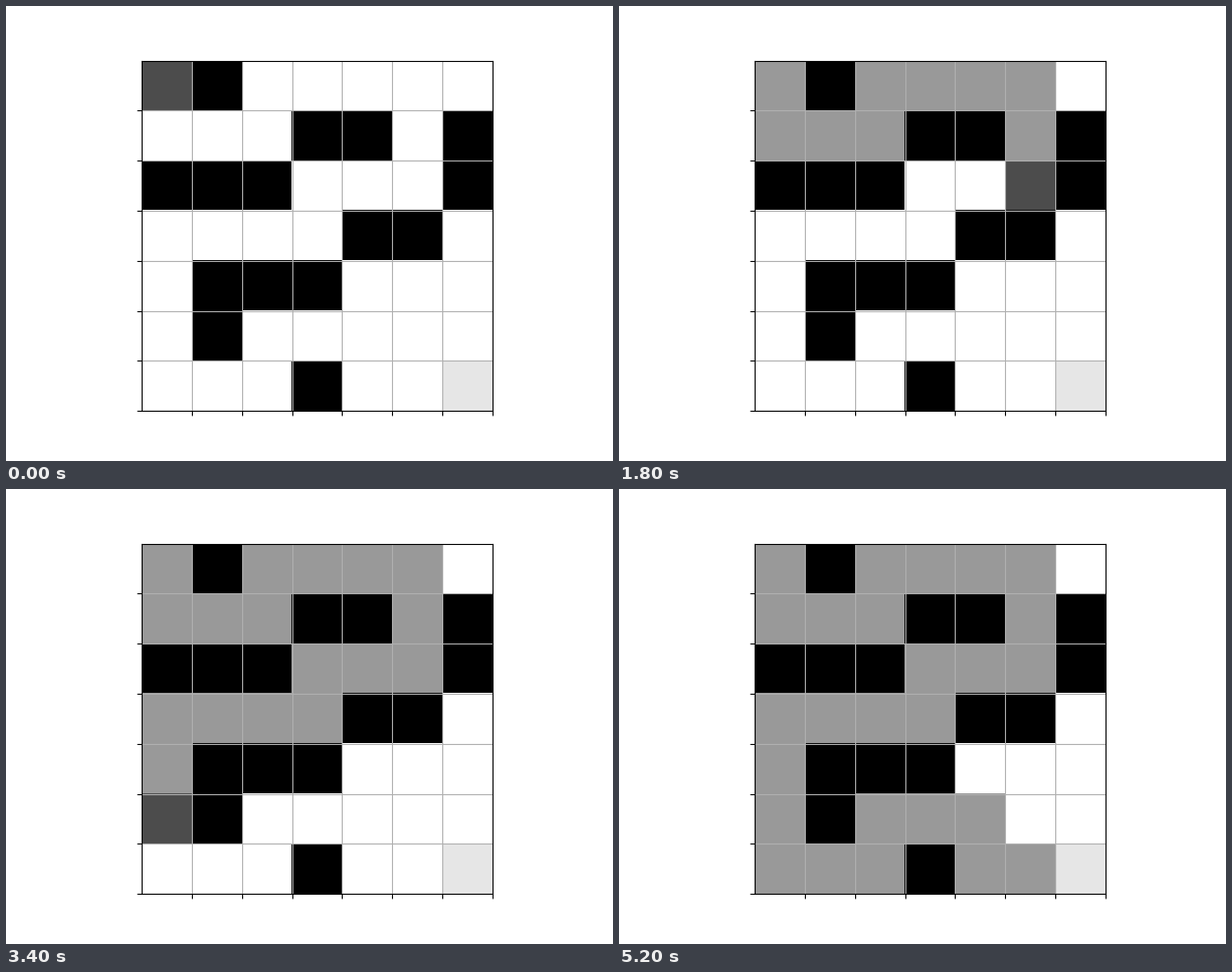
Animation of 640x480 px, one loop 5.4 s. Source, as a matplotlib script:

```python
import numpy as np
import matplotlib.pyplot as plt
from matplotlib.animation import FuncAnimation

SIZE = 7
WALL, HEAD, TRAIL, GOAL, FREE = 0.0, 0.3, 0.6, 0.9, 1.0
STEP_MS = 200

MAZE = """
.#.....
...##.#
###...#
....##.
.###...
.#.....
...#...
""".split()
MOVES = "DRRURRRDDLLDLLLDDDRRURRDRR"
DELTAS = {"U": (-1, 0), "D": (1, 0), "L": (0, -1), "R": (0, 1)}


def walk(moves):
    cells = [(0, 0)]
    for move in moves:
        dr, dc = DELTAS[move]
        row, col = cells[-1]
        cells.append((row + dr, col + dc))
    return cells


path = walk(MOVES)
base = np.array([[WALL if ch == "#" else FREE for ch in row] for row in MAZE])


def board(step):
    grid = base.copy()
    for cell in path[:step]:
        grid[cell] = TRAIL
    grid[path[step]] = HEAD
    grid[SIZE - 1, SIZE - 1] = GOAL
    return grid


fig, ax = plt.subplots(figsize=(6.4, 4.8), dpi=100)
image = ax.imshow(board(0), cmap="gray", vmin=0, vmax=1, interpolation="none")
ticks = np.arange(0.5, SIZE)
ax.set_xticks(ticks)
ax.set_yticks(ticks)
ax.set_xticklabels([])
ax.set_yticklabels([])
ax.grid(True)


def update(step):
    image.set_data(board(step))
    return [image]


anim = FuncAnimation(fig, update, frames=len(path), interval=STEP_MS,
                     repeat=True, repeat_delay=0)
plt.show()
```
